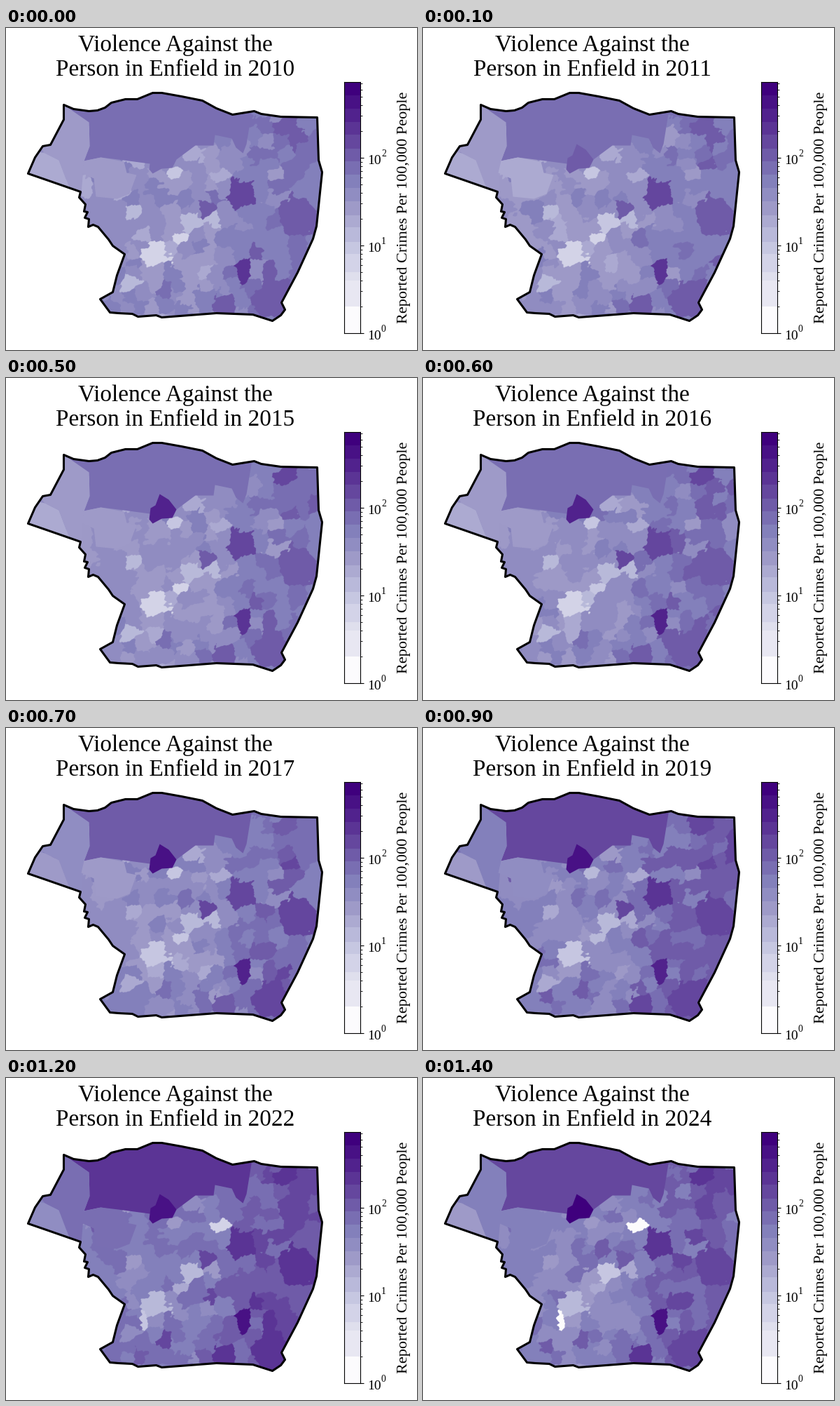
A matplotlib script for the animation above (1.5 s loop, 587 by 459 pixels).

```python
import matplotlib as mpl
import matplotlib.pyplot as plt
import numpy as np
from matplotlib.animation import FuncAnimation
from matplotlib.patches import Polygon

W, H, DPI = 587, 459, 100
FIRST_YEAR, YEARS = 2010, 15
TOP = 18
PURPLES = mpl.colormaps["Purples"]

plt.rcParams["font.family"] = "Liberation Serif"
rng = np.random.default_rng(12)

# Crime level of the rural north; other places follow it with their own share.
year = np.arange(YEARS)
trend = np.interp(year, [0, 3, 12, 14], [12, 11, 15.2, 14])
late = (year / year[-1]) ** 4


def shade(level):
    step = np.clip(np.round(level), 1, TOP)
    return PURPLES(np.where(step < 2, 0, step / TOP))


def points(*flat):
    """Pixel positions, moved to the pixel centres."""
    return np.reshape(flat, (-1, 2)) + 0.5


# ---------- figure and borough outline ----------
fig = plt.figure(figsize=(W / DPI, H / DPI), dpi=DPI, facecolor="white")
ax = fig.add_axes([0, 0, 1, 1])

outline = Polygon(points(
    82, 109, 96, 115, 118, 118, 130, 117, 141, 113, 150, 106, 170, 101,
    187, 101, 209, 92, 222, 92, 250, 97, 280, 103, 300, 114, 323, 123,
    354, 118, 364, 122, 392, 126, 444, 127, 446, 188, 451, 205, 443, 282,
    438, 300, 416, 348, 393, 391, 398, 401, 392, 409, 380, 417, 352, 408,
    300, 406, 222, 412, 214, 409, 188, 411, 180, 407, 160, 406, 148, 405,
    134, 386, 152, 376, 158, 352, 169, 322, 152, 310, 146, 301, 131, 283,
    124, 280, 117, 283, 118, 272, 112, 270, 116, 262, 111, 261, 113, 251,
    104, 241, 106, 233, 60, 217, 31, 207, 41, 184, 52, 168, 63, 166,
    82, 130), fill=False, ec="black", lw=2.2, joinstyle="round", zorder=5)
ax.add_patch(outline)

# ---------- small areas: cells around seeds, with wavy borders ----------
X0, X1, Y0, Y1, FINE = 28, 456, 88, 420, 2
GAP = 20

# x, y, radius, and how far the area departs from its surroundings,
# early and late in the period
SPOTS = np.array([
    (240, 204, 9, -4, -2), (270, 179, 13, -2, -0.5), (308, 212, 8, -2, -10),
    (336, 235, 19, 3, 2.5), (284, 256, 10, 3.5, 2), (296, 272, 9, -3, -3),
    (262, 278, 14, -3, -4.5), (248, 297, 9, -4, -2), (184, 262, 12, -2.5, -2),
    (212, 321, 18, -4, -3), (196, 344, 8, 0, -10), (176, 360, 11, -2.5, -1),
    (227, 371, 10, 2, 2.5), (338, 348, 11, 4, 4), (312, 396, 16, 2, 2.5),
    (384, 207, 9, -2.5, -1), (415, 268, 24, 1.5, 1.5), (378, 388, 26, 1.5, 1),
])


def scatter_seeds():
    """A loose hexagonal grid, thinner at both sides and clear of the spots."""
    x, y = np.meshgrid(np.arange(X0, X1, GAP), np.arange(Y0, Y1, GAP * 0.87))
    x[1::2] += GAP // 2
    grid = np.column_stack([x.ravel(), y.ravel()])
    grid = grid + rng.uniform(-7, 7, grid.shape)
    density = np.where(abs(grid[:, 0] - 275) > 110, 0.5, 1)
    gaps = np.linalg.norm(grid[:, None] - SPOTS[:, :2], axis=2)
    clear = (gaps > SPOTS[:, 2] + 4).all(axis=1)
    return grid[clear & (rng.random(len(grid)) < density)]


def ripple(x, y):
    total = 0
    for wave in (4, 6, 9, 13, 18, 26):
        angle, phase = rng.uniform(0, 2 * np.pi, 2)
        along = x * np.cos(angle) + y * np.sin(angle)
        total = total + wave / 11 * np.sin(2 * np.pi * along / wave + phase)
    return total


def label_cells(seeds, radii):
    x, y = np.meshgrid(np.arange(X0, X1, 1 / FINE), np.arange(Y0, Y1, 1 / FINE))
    wx, wy = x + ripple(x, y), y + ripple(x, y)
    best = np.full(x.shape, np.inf)
    labels = np.zeros(x.shape, int)
    for i, ((sx, sy), r) in enumerate(zip(seeds, radii)):
        dist = (wx - sx) ** 2 + (wy - sy) ** 2 - r ** 2
        near = dist < best
        best[near] = dist[near]
        labels[near] = i
    return labels


def cell_levels(seeds, count):
    """Levels per year and cell; the first `count` cells are plain ones."""
    x, y = seeds.T
    east = 1 / (1 + np.exp((325 - x - 0.15 * (y - 260)) / 14))
    pale = np.exp(-((x - 215) / 60) ** 2 - ((y - 315) / 50) ** 2)
    base = 3.9 + 0.5 * east - 0.9 * pale + np.outer(trend, 0.5 + 0.1 * east)
    noise = rng.normal(0, 0.6, len(seeds))
    noise = noise + rng.normal(0, 0.5, base.shape)
    first, last = SPOTS[:, 3], SPOTS[:, 4]
    noise[:, count:] = first + np.outer(late, last - first)
    return base + noise


plain = scatter_seeds()
seeds = np.vstack([plain, SPOTS[:, :2]])
radii = np.append(np.full(len(plain), GAP / 2), SPOTS[:, 2])
labels = label_cells(seeds, radii)
levels = cell_levels(seeds, len(plain))

cells = ax.imshow(shade(levels[0])[labels], extent=(X0, X1, Y1, Y0), zorder=1)
cells.set_clip_path(outline)
ax.set(xlim=(0, W), ylim=(H, 0), aspect="auto")
ax.axis("off")

# ---------- large rural areas ----------
zones = []


def zone(corners, zone_levels):
    patch = Polygon(corners, lw=0, zorder=2)
    ax.add_patch(patch)
    patch.set_clip_path(outline)
    zones.append((patch, zone_levels))


zone(points(82, 109, 82, 80, 350, 80, 350, 122, 343, 165, 338, 178, 328, 170,
            322, 157, 298, 152, 296, 167, 270, 167, 243, 187, 205, 193,
            160, 187, 135, 184, 111, 189, 119, 168, 118, 134), trend)
zone(points(82, 109, 118, 134, 119, 168, 111, 189, 107, 235, 91, 230, 75, 188,
            55, 178, 40, 160), trend - 3)
zone(points(20, 207, 41, 175, 55, 178, 75, 188, 91, 230), 0.7 * trend - 0.3)
zone(points(111, 189, 135, 184, 168, 190, 172, 206, 186, 209, 176, 236,
            158, 243, 128, 240, 125, 214, 107, 206), trend - 3.4)
zone(points(219, 165, 232, 173, 243, 187, 237, 199, 222, 200, 209, 207,
            204, 201, 206, 185, 213, 181), 18 - 6 * np.exp(-year / 5))

# ---------- title and colour scale ----------
title = ax.text(241.5, 68, "", size=24, ha="center", va="baseline")
ax.text(573, 255.5, "Reported Crimes Per 100,000 People", size=16, rotation=90,
        rotation_mode="anchor", ha="center", va="baseline")

bounds = np.geomspace(1, 731, TOP + 2).astype(int)
bar_top, bar_bottom = 77, 435
bar = fig.add_axes([483 / W, 1 - bar_bottom / H, 23 / W,
                    (bar_bottom - bar_top) / H])
bar.set_yscale("log")
for k, (low, high) in enumerate(zip(bounds[:-1], bounds[1:])):
    if high > low:
        bar.axhspan(low, high, color=shade(k), lw=0)
bar.set(xlim=(0, 1), ylim=(1, bounds[-1]), xticks=[])
bar.yaxis.tick_right()
bar.tick_params(axis="y", labelright=False)

decade = (bar_bottom - bar_top) / np.log10(bounds[-1])
for power in range(3):
    y = bar_bottom - power * decade
    ax.text(516.5, y + 9, "10", size=14, va="baseline")
    ax.text(536, y - 2, str(power), size=9.8, va="baseline")


def draw(i):
    title.set_text(f"Violence Against the\nPerson in Enfield in {FIRST_YEAR + i}")
    cells.set_data(shade(levels[i])[labels])
    for patch, zone_levels in zones:
        patch.set_facecolor(shade(zone_levels[i]))
    return [title, cells] + [patch for patch, _ in zones]


anim = FuncAnimation(fig, draw, frames=YEARS, interval=100, repeat=True,
                     repeat_delay=0, blit=False)
plt.show()
```
